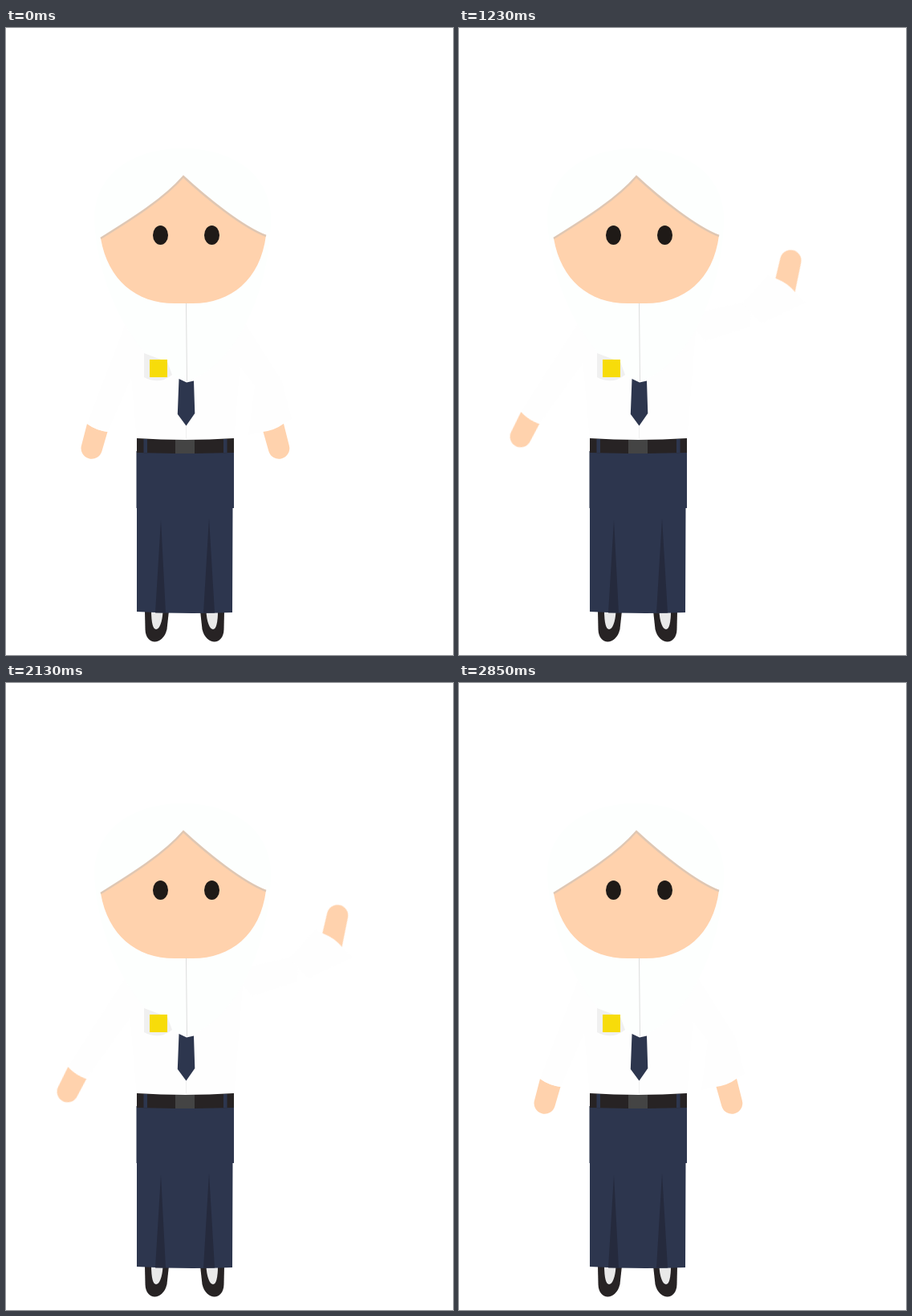
An HTML page for the animation above (3.3 s loop, 557 by 781 pixels).

```html
<!DOCTYPE html>
<html lang="en">
<head>
<meta charset="utf-8">
<title>Waving student</title>
<style>
  html, body { margin: 0; width: 100%; height: 100%; overflow: hidden; background: #fff; }
  svg { display: block; width: 557px; height: 781px; }

  .skin { fill: #ffd2ad; }
  .shirt { fill: #fefefe; }
  .navy { fill: #2d364e; }
  .pleat { fill: #252a3d; }
  .black { fill: #272324; }

  .eye, .arm, .bend {
    animation: 3300ms cubic-bezier(.37, 0, .63, 1) infinite;
  }
  .eye { fill: #1f1a17; transform-box: fill-box; transform-origin: center; animation-name: blink; }
  .left { --turn: 11.7deg; transform-origin: 162px 370px; animation-name: lift-left; }
  .right { --turn: -70.4deg; transform-origin: 283.7px 372.7px; animation-name: lift-right; }
  .bend { animation-name: wave; }
  .fore { --turn: -52.6deg; transform-origin: 327px 443px; }
  .wrist { --turn: -30deg; transform-origin: 340.7px 491.5px; }

  @keyframes blink {
    0%, 4.55%, 20.15%, 100% { transform: scale(1); }
    12.42% { transform: scale(.1); }
  }
  @keyframes lift-left {
    0%, 17.7%, 86.4%, 100% { transform: rotate(0deg); }
    36.2%, 64.7% { transform: rotate(var(--turn)); }
  }
  @keyframes lift-right {
    0%, 18.2%, 86.4%, 100% { transform: rotate(0deg); }
    33.9%, 66.5% { transform: rotate(var(--turn)); }
  }
  @keyframes wave {
    0%, 27.3%, 73.9%, 100% { transform: rotate(0deg); }
    36.4%, 64.2% { transform: rotate(var(--turn)); }
    50.3% { transform: rotate(calc(var(--turn) * .37)); }
  }
</style>
</head>
<body>
<svg viewBox="0 0 557 781">
  <!-- arms -->
  <g class="arm left">
    <path class="skin" d="M101 493Q112 501 126.500 503L119.500 527A13.200 13.200 0 0 1 94 520Z"/>
    <path class="shirt" d="M150 365L101 493Q112 501 126.500 503L172 400Z"/>
  </g>
  <g class="arm right">
    <path class="shirt" d="M296 365L344 440L310 446L275 400Z"/>
    <g class="bend fore">
      <path class="bend wrist skin" d="M342.500 479L352.800 520A13.200 13.200 0 0 1 327.300 527L316.500 489Z"/>
      <path class="shirt" d="M310 446L302 507L320.300 503Q335 501 345.800 493L356 487L344 440Z"/>
    </g>
  </g>

  <!-- torso and veil -->
  <path class="shirt" d="M150 365H296L284 515H163Z"/>
  <path fill="#fdfffe" d="M110 235C112 180 160 150 220 150S328 180 330 235C330 320 290 420 225 440C160 420 112 320 110 235Z"/>

  <!-- face -->
  <path class="skin" d="M118 262C150 242 195 215 221 185C250 212 295 248 324 258C317 314 280 343 233 343H210C162 343 127 314 118 262Z"/>
  <path fill="none" stroke="#dfc7b3" stroke-width="2.5" d="M118 262C150 242 195 215 221 185C250 212 295 248 324 259"/>
  <ellipse class="eye" cx="192.5" cy="258" rx="9.5" ry="12"/>
  <ellipse class="eye" cx="256.5" cy="258" rx="9.5" ry="12"/>

  <!-- shirt front -->
  <path fill="none" stroke="#dcdcdc" d="M224.500 343L225.500 440"/>
  <path fill="none" stroke="#f0f0f0" d="M224.500 495V512"/>
  <path fill="#f0f0f0" d="M172 405L201 416L207 432Q191 445 172 435Z"/>
  <rect fill="#f7dc0a" x="179" y="413" width="22" height="22"/>
  <path class="navy" d="M215.500 437L225 441.500L234 439.500L235.300 480L224.500 495.500L213.800 481Z"/>

  <!-- shoes -->
  <g id="shoe">
    <path class="black" d="M173 726L173.500 749C174 770 196 769 200.500 749L203 726Z"/>
    <path fill="#e9e9e9" d="M181 726C181 740 183 749 187 749S195 740 195.500 726Z"/>
  </g>
  <use href="#shoe" transform="matrix(-1 0 0 1 445 0)"/>

  <!-- skirt and belt -->
  <path class="navy" d="M162.500 527H284V598H282.500L282 728Q222 730.500 163 727V598H162.500Z"/>
  <path class="pleat" d="M193 613L199 728.500H186ZM253 611L260 728.500H246Z"/>
  <path class="black" d="M163 511Q223 515 284 511V529L234 530H211L163 529Z"/>
  <path class="navy" d="M171.500 512H176V529H171.500ZM271 512H275.500V529H271Z"/>
  <rect fill="#444" x="211" y="513" width="24" height="17"/>
</svg>
</body>
</html>
```
